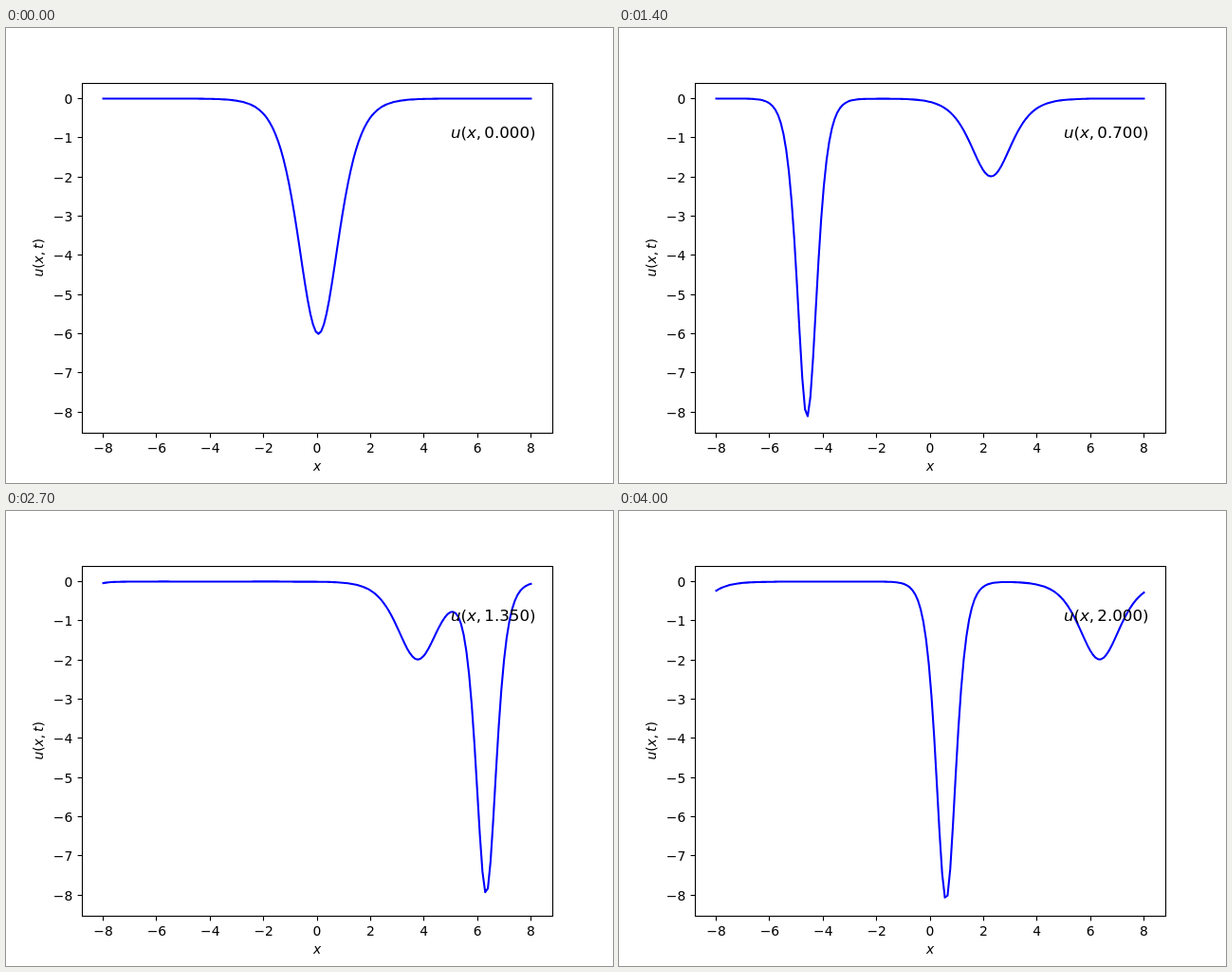
An HTML page with a canvas that plays this animation: 640 by 480 pixels, repeating every 4.1 s.

```html
<!DOCTYPE html>
<html lang="en">
<head>
<meta charset="utf-8">
<title>Two solitons</title>
<style>
html, body { margin: 0; width: 640px; height: 480px; overflow: hidden; background: #fff; }
canvas { display: block; }
</style>
</head>
<body>
<canvas id="stage" width="640" height="480"></canvas>
<script>
const ctx = document.getElementById('stage').getContext('2d');
const N = 160, DX = 0.1, DT = 0.0005, STEPS = 100;
const FRAMES = 41, FRAME_MS = 100, FRAME_DT = DT * STEPS;

// Korteweg-de Vries: u_t = 6 u u_x - u_xxx, central differences, periodic
function slope(u) {
  return u.map((v, i) => {
    const l = u[(i + N - 1) % N], r = u[(i + 1) % N];
    const ll = u[(i + N - 2) % N], rr = u[(i + 2) % N];
    return 3 * v * (r - l) / DX - (rr - 2 * r + 2 * l - ll) / (2 * DX ** 3);
  });
}

// Classic fourth-order Runge-Kutta
function step(u) {
  const shifted = (k, h) => u.map((v, i) => v + h * k[i]);
  const a = slope(u);
  const b = slope(shifted(a, DT / 2));
  const c = slope(shifted(b, DT / 2));
  const d = slope(shifted(c, DT));
  return u.map((v, i) => v + DT / 6 * (a[i] + 2 * b[i] + 2 * c[i] + d[i]));
}

function solve() {
  let u = Float64Array.from({ length: N }, (_, i) => -6 / Math.cosh((i - N / 2) * DX) ** 2);
  const states = [u];
  while (states.length < FRAMES) {
    for (let s = 0; s < STEPS; s++) u = step(u);
    states.push(u);
  }
  return states;
}

const px = x => 328 + x * 496 / 17.6;
const py = y => 74.45 - y * 41.36;
const crisp = v => Math.floor(v) + 0.5;

function line(x1, y1, x2, y2) {
  ctx.beginPath();
  ctx.moveTo(x1, y1);
  ctx.lineTo(x2, y2);
  ctx.stroke();
}

function label(text, x, y, align) {
  ctx.font = '13.89px "DejaVu Sans", sans-serif';
  ctx.textAlign = align;
  ctx.fillText(text, x, y);
}

// Draws u(x, arg) with italic variables; arg may be italic too
function formula(arg, argItalic, size, x, y, centred) {
  const parts = [['u', 1], ['(', 0], ['x', 1], [',', 0], [arg, argItalic], [')', 0]];
  const gap = 0.195 * size;
  const setFont = italic => {
    ctx.font = `${italic ? 'italic ' : ''}${size}px "DejaVu Sans", sans-serif`;
  };
  const widths = parts.map(([text, italic]) => {
    setFont(italic);
    return ctx.measureText(text).width + (text === ',' ? gap : 0);
  });
  if (centred) x -= widths.reduce((a, b) => a + b) / 2;
  ctx.textAlign = 'left';
  parts.forEach(([text, italic], i) => {
    setFont(italic);
    ctx.fillText(text, x, y);
    x += widths[i];
  });
}

function drawAxes() {
  ctx.strokeStyle = '#000';
  ctx.lineWidth = 1.11;
  ctx.lineCap = 'butt';
  ctx.lineJoin = 'miter';
  ctx.strokeRect(80.5, 58.5, 496, 369);
  const name = v => String(v).replace('-', '\u2212');
  for (let x = -8; x <= 8; x += 2) {
    const tx = crisp(px(x));
    line(tx, 427.5, tx, 432.4);
    label(name(x), px(x), 448, 'center');
  }
  for (let y = 0; y >= -8; y--) {
    const ty = crisp(py(y));
    line(80.5, ty, 75.6, ty);
    label(name(y), 70.3, ty + 5.2, 'right');
  }
  ctx.font = 'italic 13.89px "DejaVu Sans", sans-serif';
  ctx.textAlign = 'center';
  ctx.fillText('x', 328, 467);
  ctx.save();
  ctx.translate(39, 242.4);
  ctx.rotate(-Math.PI / 2);
  formula('t', 1, 13.89, 0, 0, true);
  ctx.restore();
}

function drawCurve(u) {
  ctx.strokeStyle = '#00f';
  ctx.lineWidth = 2.08;
  ctx.lineCap = 'square';
  ctx.lineJoin = 'round';
  ctx.beginPath();
  u.forEach((v, i) => ctx.lineTo(px(-8 + 16 * i / (N - 1)), py(v)));
  ctx.stroke();
}

const states = solve();

function draw() {
  const frame = Math.floor(performance.now() / FRAME_MS) % FRAMES;
  ctx.fillStyle = '#fff';
  ctx.fillRect(0, 0, 640, 480);
  ctx.fillStyle = '#000';
  drawCurve(states[frame]);
  drawAxes();
  formula((frame * FRAME_DT).toFixed(3), 0, 16.67, px(5), py(-1), false);
  requestAnimationFrame(draw);
}
draw();
</script>
</body>
</html>
```
